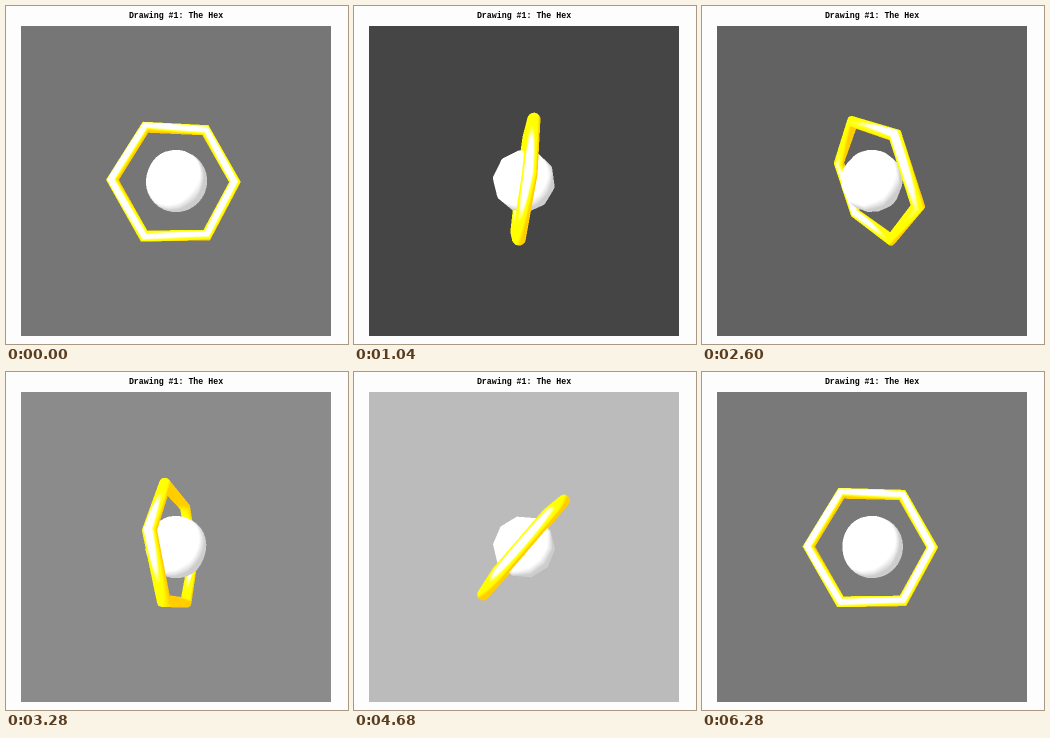
These frames come from a looping animation (342 px wide and 338 px high, 6320 ms). An HTML page with a canvas:

```html
<!DOCTYPE html>
<html lang="en">
<head>
<meta charset="utf-8">
<title>Drawing #1: The Hex</title>
<style>
  html, body { margin: 0; width: 342px; height: 338px; overflow: hidden; background: #fdfdfd; }
  canvas { position: absolute; left: 15px; top: 20px; }
  h1 {
    position: absolute; left: 0; top: 5px; width: 340px; margin: 0;
    font: bold 8.27px/10px "Liberation Mono", "Courier New", monospace;
    text-align: center; white-space: pre; color: #000;
  }
</style>
</head>
<body>
<h1>Drawing #1: The Hex</h1>
<canvas id="stage" width="310" height="310"></canvas>
<script>
const LOOP = 6320, STEP = 40;
const SIZE = 310;
const CAM = SIZE / 2 * Math.sqrt(3);   // 60 degree field of view
const HALF = 76, SS = 2;               // rendered region around the centre, supersampling
const N = HALF * 2 * SS;
const LIGHT = [-1, -1, 2].map(v => v / Math.sqrt(6));
const TAU = Math.PI * 2;

const ctx = document.getElementById('stage').getContext('2d');
const buffer = document.createElement('canvas');
buffer.width = buffer.height = N;
const bctx = buffer.getContext('2d');
const image = bctx.createImageData(N, N);
const depth = new Float32Array(N * N);

// Grid of { p: position, n: normal } joined into triangles
function mesh(cols, rows, color, point) {
  const verts = [], tris = [], at = (i, j) => i * (cols + 1) + j;
  for (let i = 0; i <= rows; i++) {
    for (let j = 0; j <= cols; j++) verts.push(point(j / cols, i / rows));
  }
  for (let i = 0; i < rows; i++) {
    for (let j = 0; j < cols; j++) {
      tris.push([at(i, j), at(i, j + 1), at(i + 1, j + 1)],
                [at(i, j), at(i + 1, j + 1), at(i + 1, j)]);
    }
  }
  return { verts, tris, color };
}

const ring = mesh(6, 16, [255, 205, 0], (u, v) => {
  const a = u * TAU, b = v * TAU, R = 62, tube = 6;
  const n = [Math.cos(a) * Math.cos(b), Math.sin(a) * Math.cos(b), Math.sin(b)];
  return { n, p: [R * Math.cos(a) + tube * n[0], R * Math.sin(a) + tube * n[1], tube * n[2]] };
});

const ball = mesh(10, 16, [205, 205, 205], (u, v) => {
  const a = u * TAU, b = (v - 0.5) * Math.PI, r = 31;
  const n = [Math.cos(b) * Math.sin(a), Math.sin(b), Math.cos(b) * Math.cos(a)];
  return { n, p: n.map(c => c * r) };
});

// Turn about y, then about x
function rotator(ax, ay) {
  const cx = Math.cos(ax), sx = Math.sin(ax), cy = Math.cos(ay), sy = Math.sin(ay);
  return ([x, y, z]) => {
    const d = z * cy - x * sy;
    return [x * cy + z * sy, y * cx - d * sx, y * sx + d * cx];
  };
}

// Phong shading with a broad highlight
function shade(k, base, x, y, z, nx, ny, nz) {
  const nl = Math.hypot(nx, ny, nz) || 1;
  nx /= nl; ny /= nl; nz /= nl;
  const dot = nx * LIGHT[0] + ny * LIGHT[1] + nz * LIGHT[2];
  const vz = CAM - z, vl = Math.hypot(x, y, vz);
  const spec = (-(2 * dot * nx - LIGHT[0]) * x - (2 * dot * ny - LIGHT[1]) * y
    + (2 * dot * nz - LIGHT[2]) * vz) / vl;
  const diffuse = 1 + 0.73 * Math.max(0, dot), shine = 510 * Math.max(0, spec);
  const d = image.data, i = k * 4;
  d[i] = base[0] * diffuse + shine;
  d[i + 1] = base[1] * diffuse + shine;
  d[i + 2] = base[2] * diffuse + shine;
  d[i + 3] = 255;
}

function fillTriangle(a, b, c, color) {
  const area = (b.sx - a.sx) * (c.sy - a.sy) - (b.sy - a.sy) * (c.sx - a.sx);
  if (Math.abs(area) < 1e-6) return;
  const lo = (...v) => Math.max(0, Math.floor(Math.min(...v)));
  const hi = (...v) => Math.min(N - 1, Math.ceil(Math.max(...v)));
  const x0 = lo(a.sx, b.sx, c.sx), x1 = hi(a.sx, b.sx, c.sx);
  const y0 = lo(a.sy, b.sy, c.sy), y1 = hi(a.sy, b.sy, c.sy);
  for (let y = y0; y <= y1; y++) {
    const py = y + 0.5;
    for (let x = x0; x <= x1; x++) {
      const px = x + 0.5;
      let u = ((b.sx - px) * (c.sy - py) - (b.sy - py) * (c.sx - px)) / area;
      let v = ((c.sx - px) * (a.sy - py) - (c.sy - py) * (a.sx - px)) / area;
      let t = 1 - u - v;
      if (u < 0 || v < 0 || t < 0) continue;
      u *= a.w; v *= b.w; t *= c.w;
      const w = u + v + t, k = y * N + x;
      if (w <= depth[k]) continue;
      depth[k] = w;
      const mix = (key, i) => (u * a[key][i] + v * b[key][i] + t * c[key][i]) / w;
      shade(k, color, mix('p', 0), mix('p', 1), mix('p', 2),
        mix('n', 0), mix('n', 1), mix('n', 2));
    }
  }
}

function drawMesh({ verts, tris, color }, turn) {
  const out = verts.map(({ p, n }) => {
    const q = turn(p), w = 1 / (CAM - q[2]), s = CAM * w;
    return { p: q, n: turn(n), w, sx: (HALF + q[0] * s) * SS, sy: (HALF + q[1] * s) * SS };
  });
  for (const [i, j, k] of tris) fillTriangle(out[i], out[j], out[k], color);
}

function draw(time) {
  const angle = 0.11 + TAU * time / LOOP;
  const turn = rotator(angle, angle * 1.5);
  image.data.fill(0);
  depth.fill(0);
  drawMesh(ball, turn);
  drawMesh(ring, turn);
  bctx.putImageData(image, 0, 0);

  const grey = Math.round(125 - 62 * Math.sin(angle));
  ctx.fillStyle = `rgb(${grey},${grey},${grey})`;
  ctx.fillRect(0, 0, SIZE, SIZE);
  ctx.drawImage(buffer, SIZE / 2 - HALF, SIZE / 2 - HALF, HALF * 2, HALF * 2);
}

const start = performance.now();
let last = -1;
function tick() {
  const step = Math.floor((performance.now() - start) % LOOP / STEP);
  if (step !== last) draw((last = step) * STEP);
  requestAnimationFrame(tick);
}
tick();
</script>
</body>
</html>
```
